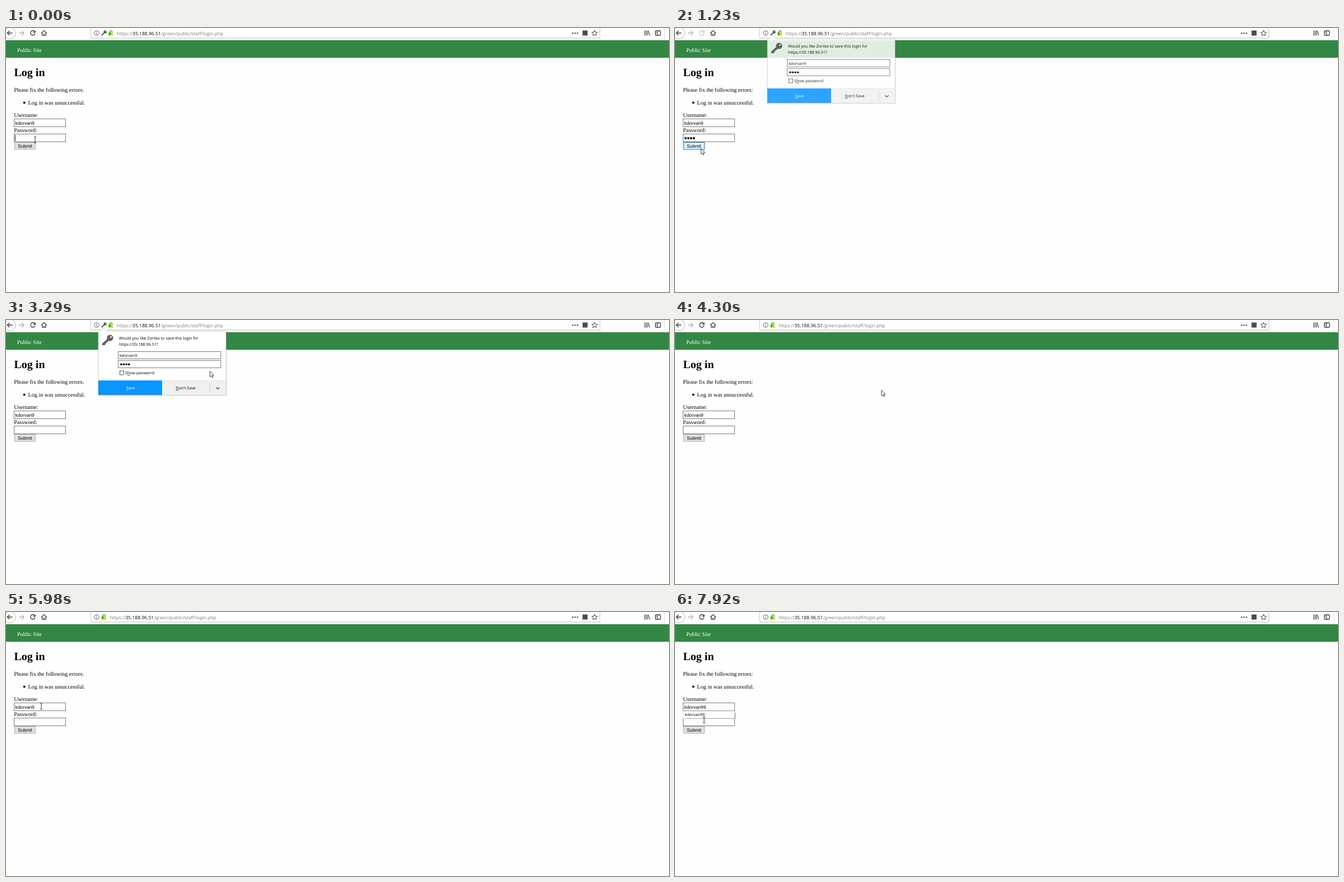
An HTML page that plays this animation: 1185x472 px, repeating every 8000 ms.

```html
<!DOCTYPE html>
<html lang="en">
<head>
<meta charset="utf-8">
<title>Log in</title>
<style>
  html, body { margin: 0; width: 100%; height: 100%; overflow: hidden; background: #fefefe; }
  svg { display: block; }
  text { white-space: pre; text-rendering: geometricPrecision; }
  .page { font: 10.1px "Liberation Serif", serif; }
  .form { font: 8.3px "Liberation Sans", sans-serif; }
  .ui { font: 7.15px "Open Sans", sans-serif; }
  .url { font: 8.3px "Open Sans", sans-serif; fill: #7b7b7b; }
  .line { fill: none; stroke: #3c3c3c; stroke-width: 1.3; }
  .field { fill: #fff; stroke: #7a7a7a; }
  .u { text-decoration: underline; }
</style>
</head>
<body>
<svg width="1185" height="472" viewBox="0 0 1185 472">
  <defs>
    <g id="keyShape">
      <circle cx="5" cy="-5" r="5.6"/>
      <path d="M1 -4 L4 -1 L-3 5 L-4 8 L-9 8 L-9 5 Z"/>
      <circle cx="6.7" cy="-6.7" r="1.5" fill="#fff"/>
    </g>
  </defs>
  <rect width="1185" height="472" fill="#fefefe"/>

  <g id="toolbar">
    <path d="M0 21.5 H1185" stroke="#e2e2e2"/>
    <path d="M1177.5 0 V21" stroke="#e4e4e4"/>
    <circle cx="7" cy="9" r="10.3" fill="#fff" stroke="#bcbcbc"/>
    <path class="line" d="M11.5 9 H2.5 M6.5 4.8 L2.3 9 L6.5 13.2"/>
    <path class="line" d="M23 9 H32 M28 4.8 L32.2 9 L28 13.2" style="stroke:#b4b4b4"/>
    <g id="reload">
      <path class="line" d="M51 6 A4.1 4.1 0 1 0 52 10"/>
      <path d="M52.8 4 V8.4 H48.4 Z" fill="#3c3c3c"/>
    </g>
    <path id="speck" d="M43 5 h2" stroke="#999"/>
    <path class="line" d="M63 9.3 L68 4.6 L73 9.3 M64.8 8.5 V13.2 H71.2 V8.5 M68 13 V10"/>
    <rect x="152" y="-5" width="910" height="24" fill="#000" opacity=".06"/>
    <rect id="urlbar" x="151.5" y="-6" width="910" height="23.8" fill="#fff" stroke="#c9c9c9"/>
    <circle class="line" cx="162" cy="9" r="4.1" style="stroke-width:.9;stroke:#555"/>
    <path d="M162 8.3 V11.6 M162 6.3 V7.4" stroke="#555"/>
    <use id="smallKey" href="#keyShape" transform="translate(174.8 9.3) scale(.48)" fill="#555"/>
    <g id="address">
      <path d="M185.3 8 V7 A2.2 2.2 0 0 1 189.7 7 V8" fill="none" stroke="#12bc00" stroke-width="1.3"/>
      <rect x="183.5" y="8" width="7" height="5.4" rx=".7" fill="#12bc00"/>
      <path d="M189 7.7 L192.6 14 H185.4 Z" fill="#ffbf00" stroke="#fff" stroke-width=".5"/>
      <g class="url">
        <text x="198" y="12.8">https://</text>
        <text x="226" y="12.8" fill="#0c0c0d" style="font-size:8.55px">35.188.96.51</text>
        <text x="277" y="12.8">/green/public/staff/login.php</text>
      </g>
    </g>
    <g fill="#4a4a4a">
      <circle cx="1013" cy="9.3" r="1.3"/><circle cx="1017.2" cy="9.3" r="1.3"/><circle cx="1021.4" cy="9.3" r="1.3"/>
      <rect x="1030.5" y="4.5" width="9" height="9"/>
    </g>
    <path class="line" style="stroke-width:1" d="M1052 4.2 L1053.5 7.4 L1057 7.8 L1054.4 10.1 L1055.1 13.6 L1052 11.9 L1048.9 13.6 L1049.6 10.1 L1047 7.8 L1050.5 7.4 Z"/>
    <path class="line" d="M1141.7 4.5 V13.5 M1144.2 4.5 V13.5 M1146.7 4.5 V13.5 M1148 4.8 L1150.5 13.5" style="stroke-width:1.1"/>
    <rect class="line" x="1160.6" y="5" width="9.2" height="8" rx="1.3"/>
    <path class="line" d="M1164.7 5 V13 M1162 7.5 H1163.5 M1162 9.5 H1163.5" style="stroke-width:1"/>
  </g>

  <g class="page">
    <rect y="22" width="1185" height="31.3" fill="#338744"/>
    <text x="20" y="43" fill="#fff">Public Site</text>
    <text x="14.5" y="86" font-size="20" font-weight="bold">Log in</text>
    <text x="14.2" y="114">Please fix the following errors:</text>
    <circle cx="32.7" cy="133.6" r="2"/>
    <text x="39.6" y="136.5">Log in was unsuccessful.</text>
    <text x="14.2" y="159.3">Username:</text>
    <text x="14.2" y="186.3">Password:</text>
  </g>

  <g class="form">
    <rect id="userField" class="field" x="14.5" y="162.5" width="92" height="14"/>
    <text id="userText" x="16.6" y="173.2"></text>
    <rect id="passField" class="field" x="14.5" y="189.5" width="92" height="14"/>
    <g id="passDots"></g>
    <rect id="submit" x="15.5" y="204.5" width="37" height="12.5"/>
    <text x="21" y="214.3">Submit</text>
    <path id="caret" stroke="#222"/>
  </g>

  <g id="suggest" class="ui">
    <path d="M107.5 180 V190.5 H19" fill="none" stroke="#8a8a8a"/>
    <rect x="14.5" y="177" width="92" height="13" fill="#fff" stroke="#cfcfcf" stroke-width=".8"/>
    <text x="17.8" y="186.2">kdorvan99</text>
  </g>

  <g id="dialog" class="ui">
    <rect x="164.5" y="20.5" width="230" height="115" fill="#000" opacity=".15"/>
    <path d="M165 20 H167.5 L175 13.8 L182.5 20 H393.3 V134 H165 Z" fill="#fff" stroke="#c4c4c4" stroke-width=".7"/>
    <use href="#keyShape" transform="translate(181 37)" fill="#606060"/>
    <text x="202" y="35.4">Would you like Zorilex to save this login for</text>
    <text x="202" y="46.2">https://35.188.96.51?</text>
    <rect class="field" x="200.5" y="56.5" width="183.5" height="13"/>
    <text x="203" y="65.6">kdorvan9</text>
    <rect id="dialogPass" class="field" x="200.5" y="72.5" width="183.5" height="13"/>
    <g id="dialogDots"></g>
    <rect x="203.5" y="91" width="7" height="7" fill="#fff" stroke="#444" stroke-width=".9"/>
    <text x="213" y="97.4">S<tspan class="u">h</tspan>ow password</text>
    <rect x="165" y="108" width="228" height="26" fill="#f0f0f0"/>
    <path d="M279 108.2 H393" stroke="#d8d8d8" stroke-width=".6"/>
    <rect id="dontSave" x="279" y="108" width="85" height="26" fill="#e8e8e8"/>
    <rect x="165" y="108" width="114" height="26" fill="#0a95ff"/>
    <path d="M364.3 112 V130" stroke="#cfcfcf"/>
    <text x="214.7" y="124.4" fill="#fff"><tspan class="u">S</tspan>ave</text>
    <text x="303.5" y="124.4"><tspan class="u">D</tspan>on't Save</text>
    <path class="line" d="M375.6 120.6 L378.6 123.4 L381.6 120.6"/>
  </g>

  <path id="arrow" d="M.5 .5 V10.6 L2.8 8.5 L4.5 12 L6 11.3 L4.4 8 H7.6 Z" fill="#fff" stroke="#333" stroke-width=".9"/>
  <path id="beam" d="M-2 -5.5 H-.6 L0 -5 L.6 -5.5 H2 M0 -5 V5 M-2 5.5 H-.6 L0 5 L.6 5.5 H2" fill="none" stroke="#333"/>
</svg>
<script>
const LOOP = 8000;
const $ = id => document.getElementById(id);
const set = (id, attrs) => {
  for (const [name, value] of Object.entries(attrs)) $(id).setAttribute(name, value);
};
const show = (id, visible) => set(id, { visibility: visible ? 'visible' : 'hidden' });
const within = (t, from, to) => t >= from && t < to;

// Pointer: start time, then x,y pairs held for one step each.
const STEP = 120;
const pointerRuns = [
  [0, 52, 200],
  [600, 51, 200, 48, 210, 46, 217, 46, 215],
  [1350, 62, 207, 112, 180, 170, 156, 214, 138, 250, 143, 300, 150],
  [2080, 335, 153, 362, 150, 382, 140, 389, 119],
  [2690, 393, 82, 395, 40, 392, 9, 388, 24, 372, 73, 364, 91, 362, 107],
  [3530, 358, 112],
  [3930, 356, 118],
  [4300, 368.5, 125, 402, 150, 421, 200, 402, 250, 330, 262, 240, 261, 172.5, 253.5],
  [5140, 140, 235, 108, 211, 88, 180, 73, 165, 66, 150, 63, 164, 63, 168.5],
  [6100, 62, 172, 60, 181, 58, 192, 58, 197, 58, 194, 58, 187, 59, 172, 60, 166],
  [7680, 57, 172, 54, 185, 52, 193]
];
const pointer = pointerRuns.flatMap(([start, ...xy]) =>
  Array.from({ length: xy.length / 2 }, (_, i) => [start + i * STEP, xy[2 * i], xy[2 * i + 1]]));

function addDots(id, x, y, gap, r) {
  $(id).innerHTML = [0, 1, 2, 3].map(i => `<circle cx="${x + i * gap}" cy="${y}" r="${r}"/>`).join('');
}
addDots('passDots', 18.8, 197, 5, 2);
addDots('dialogDots', 206, 79.3, 4.6, 1.8);

function draw(t) {
  const [, x, y] = pointer.findLast(p => p[0] <= t);
  const onForm = x >= 14 && x <= 107;
  const overUser = onForm && within(y, 162, 177);
  const overPass = onForm && within(y, 189, 204);
  const overSubmit = x <= 52 && within(y, 204, 218);
  const isBeam = overUser || overPass || (onForm && within(y, 177, 189) && t > 6000);
  const edge = hot => ({ stroke: hot ? '#171717' : '#7a7a7a' });

  show('beam', isBeam);
  show('arrow', !isBeam);
  set(isBeam ? 'beam' : 'arrow', { transform: `translate(${x} ${y})` });
  set('userField', edge(overUser));
  set('passField', edge(overPass));
  set('submit', overSubmit
    ? { fill: '#e5f1fb', stroke: '#0078d7' }
    : { fill: '#e1e1e1', stroke: '#adadad' });

  const typed = t < 1350 ? Math.min(4, Math.floor(t / STEP)) : 0;
  [...$('passDots').children].forEach((dot, i) =>
    dot.setAttribute('visibility', i < typed ? 'visible' : 'hidden'));
  $('userText').textContent = t < 7680 ? 'kdorvan9' : 'kdorvan99';

  const passCaret = t < 600;
  const userCaret = within(t, 5860, 5980) || within(t, 6340, 6820) ||
    within(t, 6940, 7310) || within(t, 7680, 7920);
  show('caret', passCaret || userCaret);
  set('caret', { d: passCaret ? `M${16.5 + typed * 5} 191 v11` : `M${t < 7680 ? 51.5 : 56} 164 v11` });
  show('suggest', t >= 7800);

  const dialogOpen = within(t, 1230, 4300);
  show('dialog', dialogOpen);
  set('dialog', { opacity: t < 1350 ? .85 : 1 });
  set('dialogPass', edge(within(t, 3170, 3410)));
  show('dontSave', dialogOpen && t >= 3530);
  set('urlbar', { stroke: within(t, 2930, 3050) ? '#a0a0a0' : '#c9c9c9' });
  show('smallKey', t < 4300);
  set('address', { transform: `translate(${t < 4300 ? 0 : -12.6} 0)` });

  const loading = within(t, 1350, 2080);
  show('reload', !loading);
  show('speck', loading);
  set('reload', { opacity: within(t, 1230, 1350) ? .28 : within(t, 2080, 2200) ? .6 : 1 });
}

const begin = performance.now();
function tick() {
  draw((performance.now() - begin) % LOOP);
  requestAnimationFrame(tick);
}
tick();
</script>
</body>
</html>
```
